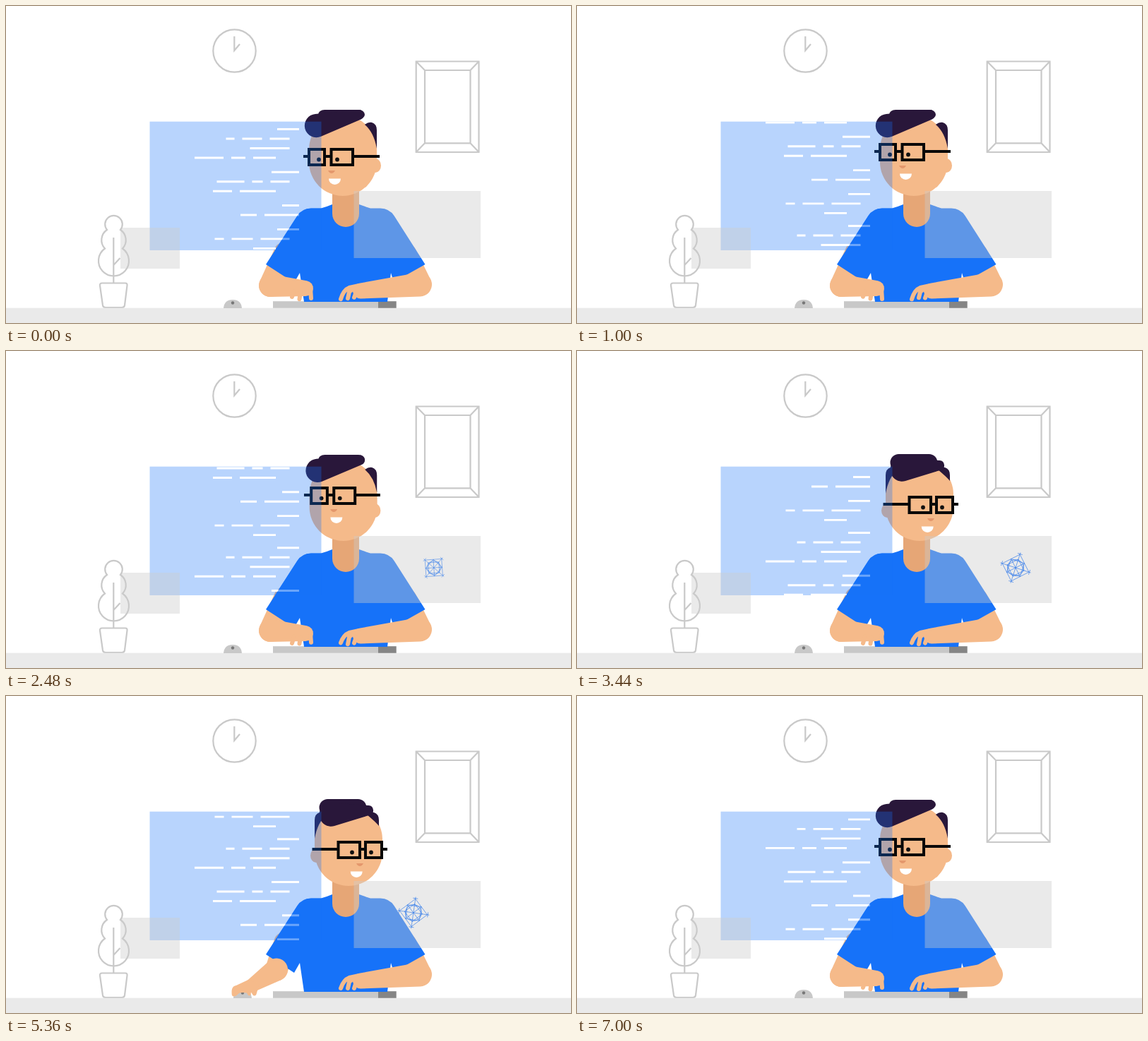
An HTML page that plays this animation: 800x449 px, repeating every 7.04 s.

```html
<!DOCTYPE html>
<html lang="en">
<head>
<meta charset="utf-8">
<title>Working at the desk</title>
<style>
  html, body { margin: 0; width: 100%; height: 100%; overflow: hidden; background: #fff; }
  svg { display: block; width: 100vw; height: 100vh; }
  .outline { fill: none; stroke: #c9c9c9; stroke-width: 2.2; }
  .skin { fill: #f5ba8a; }
  .fingers { fill: none; stroke: #f5ba8a; stroke-width: 6; stroke-linecap: round; stroke-linejoin: round; }
  .hair { fill: #29173a; }
  .blue { fill: #1672f9; }
  .pane { fill: #cbcbcb; fill-opacity: .4; }
</style>
</head>
<body>
<svg viewBox="0 0 800 449" preserveAspectRatio="none">
  <defs>
    <clipPath id="screenClip"><rect x="203.5" y="163.7" width="243" height="182.3"/></clipPath>
    <path id="shirt" d="M368 366L412.500 297Q419 287 432 286.500H446Q455 284 462 281H500Q508 284 516 286.500H530Q543 287 549.500 297L593.500 366L549 391L545 378L540 419H422L416 378L408 392Z"/>
  </defs>

  <g class="outline">
    <circle cx="323.500" cy="63.500" r="30.200"/>
    <path d="M323.300 43V63L331 54"/>
    <path d="M580.700 78.500H669.500V207H580.700ZM593 91H657.500V194.300H593ZM580.700 78.500L593 91M669.500 78.500L657.500 91M669.500 207L657.500 194.300M580.700 207L593 194.300"/>
    <path d="M143 317A12.300 12.300 0 1 1 162 317A17.500 17.500 0 0 1 165 343.500A21.500 21.500 0 1 1 140 343.500A17.500 17.500 0 0 1 143 317ZM152.300 328V392M152.300 367L161.500 357"/>
    <path d="M136 392.500H169Q172 392.500 171.500 396L168 424Q167.500 427 164 427H141Q137.500 427 137 424L133 396Q132.500 392.500 136 392.500Z"/>
  </g>
  <rect y="427.700" width="800" height="22" fill="#eaeaea"/>

  <g id="mouse">
    <path d="M-13 428Q-12 416 0 416Q12 416 13 428Z" fill="#c8c8c8"/>
    <circle cy="420.500" r="2.200" fill="#777"/>
  </g>
  <rect x="378" y="418.200" width="149" height="9.600" fill="#c8c8c8"/>
  <rect x="527" y="418.200" width="25.700" height="9.600" fill="#858585"/>

  <path id="upperLeft" class="skin"/>
  <path id="upperRight" class="skin"/>
  <use href="#shirt" class="blue"/>
  <path d="M462 255H500V294A19 19 0 0 1 462 294Z" fill="#e6a676"/>
  <path id="foreRight" class="skin"/>
  <path id="fingersRight" class="fingers"/>
  <path id="foreLeft" class="skin"/>
  <path id="fingersLeft" class="fingers"/>
  <path id="mouseHand" class="skin" d="M-15 424Q-17 411 -9 410L8 402L24 407L20 421Q19 426 15 424L12 419.500Q12 426 8 424L6 420.500Q-4 419 -6 422Q-12 428 -15 424Z"/>

  <ellipse id="earLeft" class="skin" rx="8" ry="10" cy="226"/>
  <ellipse id="earRight" class="skin" rx="8" ry="10" cy="226"/>
  <rect id="face" class="skin" y="155" width="96" height="114" rx="48"/>
  <path id="burnLeft" class="hair"/>
  <path id="burnRight" class="hair"/>
  <rect id="crown" class="hair"/>
  <path id="fringe" class="hair"/>
  <path id="nose" d="M-5 -1H5Q3 3 0 3T-5 -1Z" fill="#e4976c"/>
  <path id="mouth" d="M-8.500 0H8.500A8.500 8.500 0 0 1 -8.500 0Z" fill="#fff"/>
  <circle id="eyeA" r="2.900" fill="#111"/>
  <circle id="eyeB" r="2.900" fill="#111"/>
  <path id="glasses" fill="none" stroke="#080808" stroke-width="4"/>

  <rect class="pane" x="492.500" y="262" width="179.500" height="95"/>
  <rect class="blue" x="203.500" y="163.700" width="243" height="182.300" fill-opacity=".3"/>
  <g clip-path="url(#screenClip)">
    <path id="code" fill="none" stroke="#fff" stroke-width="2.900"/>
    <use href="#shirt" class="blue" fill-opacity=".64"/>
  </g>
  <rect class="pane" x="162" y="314" width="84" height="58"/>
  <g id="icon" fill="none" stroke="#2573ea" stroke-width=".7" stroke-opacity=".8">
    <path d="M-14 -14H14V14H-14ZM-9 -9H9V9H-9ZM0 -14V14M-14 0H14M-16 -16L16 16M-16 16L16 -16M0 -14L14 0L0 14L-14 0Z"/>
    <path d="M12 17L17 12M-12 17L-17 12M12 -17L17 -12M-12 -17L-17 -12"/>
    <circle r="11.500"/>
  </g>
</svg>
<script>
const LOOP = 7040, CODE_HEIGHT = 187;
const el = id => document.getElementById(id);
const set = (id, name, value) => el(id).setAttribute(name, value);
const place = (id, x, y = 0) => set(id, 'transform', `translate(${x} ${y})`);
const show = (id, on) => set(id, 'visibility', on ? 'visible' : 'hidden');
const lerp = (a, b, p) => a + (b - a) * p;
const ramp = (t, from, to) => Math.min(1, Math.max(0, (t - from) / (to - from)));
const smooth = (t, from, to) => { const p = ramp(t, from, to); return p * p * (3 - 2 * p); };
const inOut = (t, from, to) => { const p = ramp(t, from, to); return p < .5 ? 4 * p ** 3 : 1 - 4 * (1 - p) ** 3; };
const out = (t, from, to) => 1 - (1 - ramp(t, from, to)) ** 3;

// Right-aligned paragraphs of words: each string is one line of word widths.
function codeBlock(top) {
  const paragraphs = [['31', '12 28 28', '56', '41 20 32'], ['39', '39 15 27', '27 51'], ['24', '23 49'], ['31', '13 30 41', '32']];
  let path = '', y = top;
  for (const lines of paragraphs) {
    lines.forEach((line, i) => {
      const last = i === lines.length - 1;
      let x = i === 0 || lines.length < 3 ? 415 : last ? 382 : 401.5;
      for (const width of line.split(' ').reverse()) {
        path += `M${x} ${y}h${-width}`;
        x -= +width + 11;
      }
      y += 13.5;
    });
    y += 6.8;
  }
  return path;
}
set('code', 'd', [-1, 0, 1, 2].map(i => codeBlock(174.5 + i * CODE_HEIGHT)).join(''));

// Tapered limb with round ends.
function limb(x1, y1, r1, x2, y2, r2) {
  const len = Math.hypot(x2 - x1, y2 - y1), dir = Math.atan2(y2 - y1, x2 - x1);
  const spread = Math.acos((r1 - r2) / len);
  const at = (x, y, r, a) => `${x + r * Math.cos(a)} ${y + r * Math.sin(a)}`;
  return `M${at(x1, y1, r1, dir + spread)}A${r1} ${r1} 0 1 1 ${at(x1, y1, r1, dir - spread)}` +
    `L${at(x2, y2, r2, dir - spread)}A${r2} ${r2} 0 0 1 ${at(x2, y2, r2, dir + spread)}Z`;
}

// Hair beside the temple; side is 1 on the right of the face, -1 on the left.
const sideburn = (x, side, bottom) =>
  `M${x - 17 * side} 168Q${x - 12 * side} 164 ${x - 7 * side} 165Q${x} 167 ${x} 176V${bottom}Q${x - 4 * side} 179 ${x - 17 * side} 168Z`;

function drawHead(t) {
  const turn = inOut(t, 2320, 2920) - inOut(t, 5500, 6180);
  const mix = (a, b) => lerp(a, b, turn);
  const nod = 7 * smooth(t, 0, 1000) + 3 * smooth(t, 1000, 2480) - 10 * smooth(t, 5200, 6900);
  const y = mix(213 - nod, 217);

  set('face', 'x', mix(429, 437));
  set('earLeft', 'cx', mix(447, 439));
  set('earRight', 'cx', mix(523, 515));
  set('burnRight', 'd', sideburn(mix(525, 528), 1, mix(202, 184)));
  set('burnLeft', 'd', sideburn(mix(433, 437), -1, mix(178, 202)));
  const crownLeft = mix(442, 443.5);
  set('crown', 'x', crownLeft);
  set('crown', 'y', mix(147, 146));
  set('crown', 'width', mix(508, 510.5) - crownLeft);
  set('crown', 'height', mix(13.5, 24));
  set('crown', 'rx', mix(9, 12));
  set('fringe', 'd', limb(mix(439.5, 460.2), mix(169.5, 168), 16.7, mix(500, 513), mix(154, 162), 7));

  place('nose', mix(461, 501), y + 21);
  place('mouth', mix(465.5, 496.2), y + 31.5);
  place('eyeA', mix(443, 490), y + 4.5);
  place('eyeB', mix(469, 517), y + 4.5);
  const [a, b, c, d] = [mix(429, 470.5), mix(451, 501), mix(460.5, 509), mix(491, 532)];
  const lens = (l, r) => `M${l} ${y - 10}H${r}V${y + 12}H${l}Z`;
  set('glasses', 'd', lens(a, b) + lens(c, d) +
    `M${mix(421, 433.5)} ${y}H${a}M${b} ${y}H${c}M${d} ${y}H${mix(529, 540)}`);
}

function drawArms(t) {
  const reach = smooth(t, 3640, 4160) - smooth(t, 6080, 6480);
  const mouseX = 321 + 17 * (smooth(t, 4160, 4480) - smooth(t, 5160, 5900));
  const typing = t < 3640 || t > 6480;
  const tap = phase => typing ? 1.3 * Math.sin(t / 320 * 2 * Math.PI + phase) : 0;
  const finger = (x, y, lean, phase) => `M${x} ${y}L${x - lean} ${y + 9 + tap(phase)}`;
  place('mouse', mouseX);

  const elbow = [lerp(374, 383, reach), lerp(396, 387.5, reach)];
  const wrist = [lerp(424, mouseX + 13, reach), lerp(400, 410, reach)];
  set('upperLeft', 'd', limb(395, 350, 16, ...elbow, 15.9));
  set('foreLeft', 'd', limb(...elbow, 16, ...wrist, lerp(11, 9.5, reach)));
  show('mouseHand', reach > .5);
  place('mouseHand', wrist[0] - 13, wrist[1] - 410);
  show('fingersLeft', reach <= .5);
  place('fingersLeft', wrist[0] - 424, wrist[1] - 400);
  set('fingersLeft', 'd', `M423 394Q430 393 431 400L432 ${414 + tap(0)}` +
    finger(417, 405, 1.5, 2) + finger(408, 404, 3, 4));

  set('upperRight', 'd', limb(566, 352, 16, 586, 394, 16.5));
  set('foreRight', 'd', limb(586, 394.5, 17, 502, 403.5, 11));
  set('fingersRight', 'd', `M500 396L486 399Q478 402 474 ${414 + tap(1)}` +
    `M492 400L486 405` + finger(486, 405, 2, 3) + finger(496, 405, 3, 5));
}

function drawIcon(t) {
  const scale = out(t, 2280, 2720) * (1 - smooth(t, 6480, 6860));
  const x = lerp(lerp(600, 621, smooth(t, 2280, 2860)), 247, inOut(t, 5120, 5900));
  const angle = -4 - .052 * Math.max(0, t - 3000);
  show('icon', scale > .01);
  set('icon', 'transform', `translate(${x} 307) rotate(${angle}) scale(${scale})`);
}

function drawCode(t) {
  place('code', 0, -(50 * ramp(t, 0, 1000) + 54 * ramp(t, 1000, 3440) +
    73 * ramp(t, 3440, 6000) + 10 * ramp(t, 6000, LOOP)));
}

function tick() {
  const t = performance.now() % LOOP;
  for (const draw of [drawCode, drawHead, drawArms, drawIcon]) draw(t);
  requestAnimationFrame(tick);
}
tick();
</script>
</body>
</html>
```
